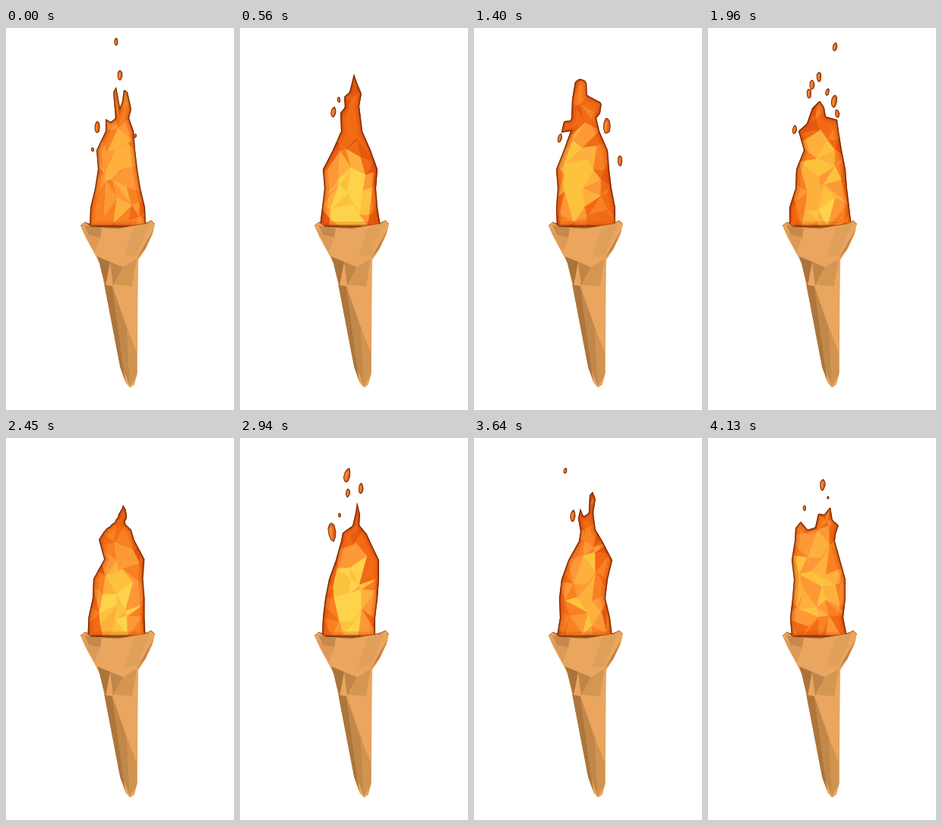
An HTML page with a canvas for the animation above (4.2 s loop, 300 px wide and 500 px high).

```html
<!DOCTYPE html>
<html lang="en">
<head>
<meta charset="utf-8">
<title>Low-poly torch</title>
<style>
html, body { margin: 0; width: 100%; height: 100%; overflow: hidden; background: #fff; }
canvas { display: block; }
</style>
</head>
<body>
<canvas id="stage" width="300" height="500"></canvas>
<script>
const ctx = document.getElementById('stage').getContext('2d');
const LOOP = 4200, STEP = 70;
const BASE_Y = 260, ROW = 25, CROWN = 40;
const FACET_RISE = 0.07, DROP_RISE = 0.08;
const HEAT = ['#cf480c', '#e6590f', '#f26b14', '#f98121', '#fd9836', '#fdb03c', '#fdc23c', '#fed24a'];

// sides: x every ROW pixels upwards; crown: ragged top; core: hot ellipse; drops: x, y, half height
const POSES = [
  {
    at: 0, left: [110, 111, 117, 121, 119, 131], right: [184, 183, 177, 173, 170, 168],
    crown: '131,119 138,123 144,118 141,84 145,77 150,104 153,96 155,80 160,84 165,106 162,118',
    cool: 0.42, core: { x: 145, y: 185, rx: 30, ry: 65, gain: 0.2 },
    drops: '145,18,5 150,62,7 120,130,8 114,159,3 170,141,3'
  },
  {
    at: 560, left: [105, 108, 111, 109, 122, 133], right: [185, 181, 179, 181, 172, 161],
    crown: '132,111 138,104 137,90 144,84 150,60 154,72 160,86 157,102',
    cool: 0.22, core: { x: 143, y: 222, rx: 30, ry: 60, gain: 0.75 },
    drops: '130,94,4 123,110,7'
  },
  {
    at: 1400, left: [109, 108, 110, 108, 118, 127], right: [186, 186, 181, 178, 176, 165],
    crown: '115,137 118,122 128,121 129,94 133,70 140,66 148,70 149,88 168,98 166,112 161,118',
    cool: 0.32, core: { x: 135, y: 195, rx: 24, ry: 65, gain: 0.5 },
    drops: '175,128,11 192,174,7 113,144,6'
  },
  {
    at: 1960, left: [107, 107, 115, 116, 126, 119], right: [189, 186, 183, 181, 176, 172],
    crown: '130,125 137,105 147,95 153,104 155,116 170,120',
    cool: 0.25, core: { x: 148, y: 215, rx: 28, ry: 80, gain: 0.55 },
    drops: '167,25,6 146,64,7 137,74,7 133,86,7 157,84,5 166,96,9 170,112,6 114,133,6'
  },
  {
    at: 2940, left: [108, 109, 112, 117, 126, 133], right: [178, 178, 181, 183, 183, 171],
    crown: '135,124 148,115 152,98 154,84 158,100 157,114 167,126',
    cool: 0.25, core: { x: 147, y: 215, rx: 26, ry: 70, gain: 0.68 },
    drops: '141,49,10 159,66,7 142,72,6 131,101,3 121,123,13'
  },
  {
    at: 3640, left: [109, 113, 112, 115, 124, 138], right: [182, 179, 173, 176, 182, 169],
    crown: '140,122 137,105 140,92 144,103 151,98 152,75 156,70 160,80 157,98 160,120',
    cool: 0.3, core: { x: 147, y: 205, rx: 24, ry: 80, gain: 0.38 },
    drops: '120,43,4 130,102,8'
  },
  {
    at: 4130, left: [110, 108, 111, 113, 110, 114], right: [183, 178, 181, 181, 174, 167],
    crown: '115,118 122,109 131,120 141,117 145,99 153,100 161,90 164,108 172,114 168,126',
    cool: 0.42, core: { x: 142, y: 185, rx: 32, ry: 60, gain: 0.3 },
    drops: '127,92,4 151,61,8 158,78,2'
  }
];

const points = s => s.split(' ').map(p => p.split(',').map(Number));
const mix = (a, b, p) => a + (b - a) * p;
const clamp = v => Math.max(0, Math.min(1, v));
const hash = (a, b = 0) => {
  const v = Math.sin(a * 127.1 + b * 311.7 + 11.3) * 43758.5453;
  return v - Math.floor(v);
};

const RIM = points('98,259 104,254 112,260 147,262 184,256 191,252 196,257');
const TORCH = [...RIM, ...points('193,270 184,289 174,304 173,452 169,467 163,471 157,464 150,444 130,340 123,308 104,273')];
const TORCH_FACETS = [
  ['#c6894c', '103,258 126,262 124,274 109,271'],
  ['#dc9a56', '98,259 109,271 124,274 117,294'],
  ['#e0a05a', '168,262 190,254 172,298 155,300'],
  ['#bd8145', '195,262 172,302 183,289'],
  ['#aa743c', '120,299 137,306 131,338'],
  ['#c08649', '137,306 154,313 141,338'],
  ['#d59652', '154,313 172,302 166,338 143,336'],
  ['#ad763d', '129,336 140,338 157,462 150,444'],
  ['#c18849', '140,338 159,392 163,469 155,448'],
  ['#d09350', '159,392 172,425 172,455 163,469']
].map(([color, s]) => [color, points(s)]);

// Evenly spaced samples, so that two crowns can be blended point by point
function resample(pts, count) {
  const dist = [0];
  for (let i = 1; i < pts.length; i++)
    dist.push(dist[i - 1] + Math.hypot(pts[i][0] - pts[i - 1][0], pts[i][1] - pts[i - 1][1]));
  const total = dist[dist.length - 1];
  let j = 1;
  return Array.from({ length: count }, (_, i) => {
    const d = total * i / (count - 1);
    while (j < pts.length - 1 && dist[j] < d) j++;
    const p = (d - dist[j - 1]) / (dist[j] - dist[j - 1]);
    return [mix(pts[j - 1][0], pts[j][0], p), mix(pts[j - 1][1], pts[j][1], p)];
  });
}

for (const pose of POSES) {
  const side = xs => xs.map((x, i) => [x, BASE_Y - i * ROW]);
  pose.edge = [...side(pose.left), ...resample(points(pose.crown), CROWN), ...side(pose.right).reverse()];
  pose.sparks = points(pose.drops);
}

function trace(pts) {
  ctx.beginPath();
  pts.forEach(([x, y]) => ctx.lineTo(x, y));
  ctx.closePath();
}

function fill(pts, color) {
  trace(pts);
  ctx.fillStyle = color;
  ctx.fill();
}

function clipTo(pts, paint) {
  ctx.save();
  trace(pts);
  ctx.clip();
  paint();
  ctx.restore();
}

function flameEdge(a, b, p, t) {
  const sway = Math.sin(Math.PI * p);
  return a.edge.map(([x, y], i) => {
    const nx = mix(x, b.edge[i][0], p), ny = mix(y, b.edge[i][1], p);
    const h = clamp((255 - ny) / 130);
    const wave = 4 * Math.sin(ny * 0.1 + t * 0.012) + 2 * (hash(i, t) - 0.5);
    return [nx + wave * sway * h, ny - 6 * sway * h * h * (1 + Math.sin(t * 0.01))];
  });
}

function heatAt(pose, x, y) {
  const { core } = pose;
  const d = Math.hypot((x - core.x) / core.rx, (y - core.y) / core.ry);
  return pose.cool + core.gain * clamp(1.35 - d * d);
}

// A rising mesh of jittered triangles, each coloured by its heat
function drawFacets(a, b, p, t) {
  const cw = 17, ch = 23, shift = t * FACET_RISE;
  const first = Math.floor((40 + shift) / ch), last = Math.ceil((275 + shift) / ch);
  const node = (c, r) => [
    92 + cw * (c + 0.9 * (hash(c, r) - 0.5)),
    ch * (r + 0.9 * (hash(c + 40, r) - 0.5)) - shift
  ];
  ctx.lineWidth = 0.7;
  for (let r = first - 1; r <= last; r++) for (let c = -1; c < 8; c++) {
    const q = [node(c, r), node(c + 1, r), node(c + 1, r + 1), node(c, r + 1)];
    const turn = hash(c, r + 0.5) < 0.5 ? 0 : 1;
    for (const k of [0, 2]) {
      const tri = [0, 1, 2].map(i => q[(turn + k + i) % 4]);
      const x = (tri[0][0] + tri[1][0] + tri[2][0]) / 3;
      const y = (tri[0][1] + tri[1][1] + tri[2][1]) / 3;
      const noise = 0.32 * (hash(c + k * 9, r + 3) - 0.5);
      const heat = clamp(mix(heatAt(a, x, y), heatAt(b, x, y), p) + noise);
      const color = HEAT[Math.round(heat * (HEAT.length - 1))];
      fill(tri, color);
      ctx.strokeStyle = color;
      ctx.stroke();
    }
  }
}

function drawFlame(a, b, p, t) {
  const edge = flameEdge(a, b, p, t);
  clipTo(edge, () => {
    drawFacets(a, b, p, t);
    // Narrow tips darken most, because the rims from both sides meet there
    trace(edge);
    for (const [width, color] of [[13, 'rgba(215,70,5,0.25)'], [6, 'rgba(150,45,0,0.3)'], [2.4, 'rgba(85,25,0,0.75)']]) {
      ctx.lineWidth = width;
      ctx.strokeStyle = color;
      ctx.stroke();
    }
  });
}

function drawDrops(pose, t) {
  const age = t - pose.at;
  const size = age < 0 ? 1 + age / 350 : 1 - age / 280;
  if (size <= 0) return;
  for (const [x, y, ry] of pose.sparks) {
    const rx = 1 + ry * 0.33;
    ctx.save();
    ctx.translate(x, y - age * DROP_RISE);
    ctx.rotate(0.5 * (hash(x, y) - 0.4));
    ctx.scale(size, size);
    const shape = Array.from({ length: 9 }, (_, i) => {
      const angle = i / 9 * Math.PI * 2, k = 0.9 + 0.2 * hash(i, x);
      return [rx * k * Math.cos(angle), ry * k * Math.sin(angle)];
    });
    clipTo(shape, () => {
      fill(shape, '#e2601a');
      fill([[-rx, -ry * 0.3], [rx * 0.2, -ry * 0.6], [0, ry * 0.7], [-rx, ry]], '#f68a2c');
      trace(shape);
      ctx.lineWidth = 2;
      ctx.strokeStyle = 'rgba(90,28,2,0.8)';
      ctx.stroke();
    });
    ctx.restore();
  }
}

function drawTorch() {
  clipTo(TORCH, () => {
    fill(TORCH, '#eaa55f');
    TORCH_FACETS.forEach(([color, pts]) => fill(pts, color));
  });
  ctx.beginPath();
  RIM.forEach(([x, y]) => ctx.lineTo(x, y));
  ctx.lineWidth = 1;
  ctx.strokeStyle = '#a9611f';
  ctx.stroke();
}

function draw() {
  const t = Math.floor((performance.now() % LOOP) / STEP) * STEP;
  const k = POSES.filter(pose => pose.at <= t).length - 1;
  const a = POSES[k], b = POSES[k + 1] || a;
  const p = a === b ? 0 : (t - a.at) / (b.at - a.at);
  ctx.fillStyle = '#fff';
  ctx.fillRect(0, 0, 300, 500);
  fill([[104, 254], [114, 257], [180, 256], [190, 253], [176, 262], [114, 262]], '#a85a1c');
  drawFlame(a, b, p, t);
  drawDrops(a, t);
  if (b !== a) drawDrops(b, t);
  drawTorch();
  requestAnimationFrame(draw);
}
draw();
</script>
</body>
</html>
```
